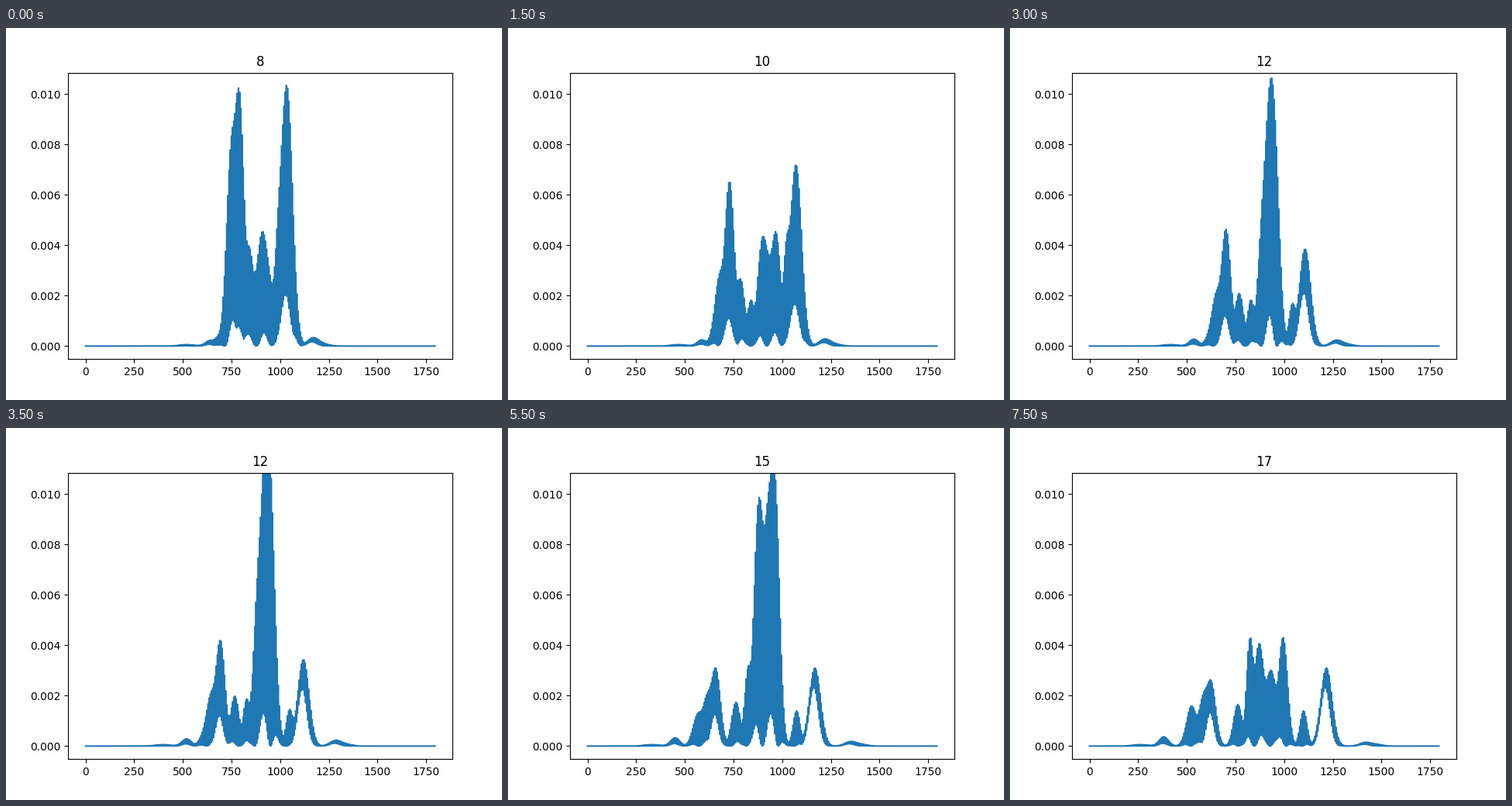
A matplotlib script for the animation above (8000 ms loop, 640x480 px).

```python
import numpy as np
import matplotlib.pyplot as plt
from matplotlib.animation import FuncAnimation

FRAMES, INTERVAL = 16, 500
FRINGE = 6          # interference period in grid cells
CELLS = 1796
PEAK = 0.01034      # sets the fixed vertical range

x = np.arange(CELLS)


def gauss(centre, height, width):
    return height * np.exp(-0.5 * ((x - centre) / width) ** 2)


def fade(t, life):
    return np.exp(-t / life)


def pulse(t, peak, span, power=2):
    return np.exp(-abs((t - peak) / span) ** power)


def rise(t, middle):
    return 1 / (1 + np.exp(middle - t))


def left_packets(t):
    """Rows of centre, height / 1000 and width, drifting left."""
    return [
        (640 - 17.2 * t, .22 + .01 * t, 24),
        (690 - 11 * t, .4 + 1.2 * rise(t, 10), 26),
        (700 - 7.5 * t + 52 * fade(t, 1.2), 2 + 6 * fade(t, 1.5), 26),
        (752 - 8.5 * t + 38 * fade(t, 1.2), 2 + 7.8 * fade(t, 5.5), 24),
    ]


def centre_packets(t):
    """Trapped part, which swells and shrinks between the two sides."""
    return [
        (762 + 80 * fade(t, 2.5), 1.6 + 2.2 * fade(t, 4), 22),
        (825 + 50 * fade(t, 2.5), 1.8 + 2.5 * rise(t, 11), 18),
        (905 - 2.2 * t, 4 + 7.5 * pulse(t, 9.7, 2.4), 25),
        (932, 3 + 10 * pulse(t, 8.4, 3.2, 4), 30),
        (955 + .7 * (t - 7.5) ** 2, 4.3 + 6 * pulse(t, 10.3, 1.7), 23),
    ]


def right_packets(t):
    return [
        (1005 + 6.3 * t, 1.4 + 2.5 * pulse(t, 3, 2), 18),
        (1034 + 12.2 * t, 3.1 + 7.2 * pulse(t, 0, 4), 29),
        (1170 + 16.5 * t, .33 * fade(t, 18), 30),
    ]


def density(t):
    left, right = left_packets(t), right_packets(t)
    packets = left + centre_packets(t) + right
    high = np.sqrt(sum(gauss(*p) ** 2 for p in packets))
    high += gauss(left[0][0] - 120, .06, 40) + gauss(right[-1][0] + 60, .06, 30)

    # troughs of the fringes
    low = 0.06 * high * (1 + np.sin(x / 13 + t))
    thin = ((left[0], .3), (left[-1], .08 + .03 * t),
            (right[1], .75 - .55 * pulse(t, 0, 6, 4)), (right[-1], .5))
    for (c, h, w), ratio in thin:
        low = np.maximum(low, gauss(c - .2 * w, ratio * h, .8 * w))
    low = np.minimum(low, high)

    fringe = np.cos(np.pi * x / FRINGE) ** 2
    return (low + (high - low) * fringe) / 1000


fig, ax = plt.subplots(figsize=(6.4, 4.8), dpi=100)
line, = ax.plot(x, density(0))
ax.set_ylim(-0.05 * PEAK, 1.05 * PEAK)
title = ax.set_title("8")


def update(step):
    line.set_ydata(density(step))
    title.set_text(str(int(8.89 + 0.56 * step)))
    return line, title


anim = FuncAnimation(fig, update, frames=FRAMES, interval=INTERVAL,
                     repeat=True, repeat_delay=0)
plt.show()
```
